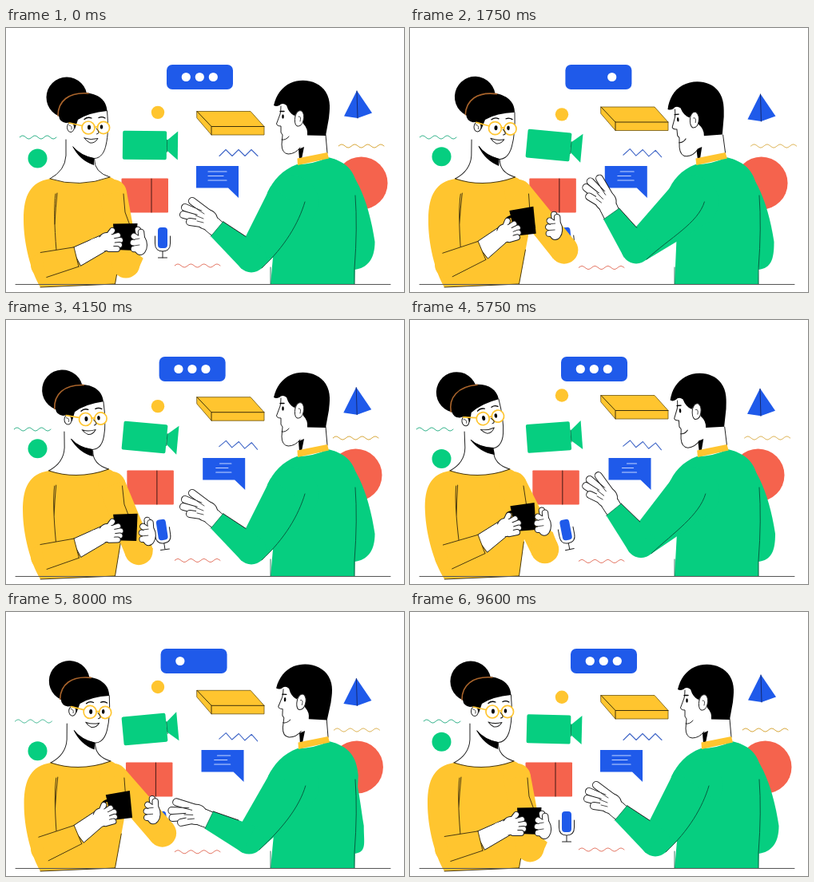
Animation, 498 px wide and 331 px high, one loop 9.65 s. Source, as an HTML page with a canvas:

```html
<!DOCTYPE html>
<html lang="en">
<head>
<meta charset="utf-8">
<title>Conversation</title>
<style>
  html, body { margin: 0; width: 100%; height: 100%; overflow: hidden; background: #fff; }
  canvas { display: block; width: 498px; height: 331px; }
</style>
</head>
<body>
<canvas id="stage"></canvas>
<script>
const BLUE = '#1f5aea', YELLOW = '#ffc52f', GREEN = '#06ce80', RED = '#f5634d';
const INK = '#000', LINE = '#222', FOLD = '#4a3a10', SEAM = '#075e40';
const LOOP = 9650, HALF = LOOP / 2, STEP = 50;
const W = 498, H = 331;
const canvas = document.getElementById('stage');
const c = canvas.getContext('2d');
const dpr = window.devicePixelRatio || 1;
canvas.width = W * dpr;
canvas.height = H * dpr;

// Smooth periodic curve through [time, value] keys, without overshoot.
function ease(t, period, keys) {
  const n = keys.length;
  const time = k => keys[(k + n) % n][0] + Math.floor(k / n) * period;
  const val = k => keys[(k + n) % n][1];
  const slope = k => (val(k + 1) - val(k)) / (time(k + 1) - time(k));
  const tangent = k => {
    const a = slope(k - 1), b = slope(k);
    return a * b <= 0 ? 0 : 2 * a * b / (a + b);
  };
  t %= period;
  let i = n - 1;
  while (time(i) > t) i--;
  const h = time(i + 1) - time(i), u = (t - time(i)) / h, u2 = u * u, u3 = u2 * u;
  return val(i) * (2 * u3 - 3 * u2 + 1) + val(i + 1) * (3 * u2 - 2 * u3)
    + h * (tangent(i) * (u3 - 2 * u2 + u) + tangent(i + 1) * (u3 - u2));
}

// Everything that moves is driven by these few signals.
let now, drift, lift, reach, raise, spread, sway;
function pose(t) {
  now = t;
  drift = ease(t, LOOP, [[0, 0], [1750, .55], [3100, .33], [4150, .78], [5750, 1], [8000, .62]]);
  lift = ease(t, HALF, [[0, 0], [925, .75], [1750, 1], [3100, 0], [4150, 0]]);
  reach = ease(t, HALF, [[0, 0], [1750, 0], [3100, 1], [4150, 0]]);
  raise = ease(t, HALF, [[0, 0], [925, .75], [1750, 1], [3100, 1], [4150, .1]]);
  spread = ease(t, HALF, [[0, 0], [925, 0], [1750, .85], [3100, 1], [4150, .65]]);
  sway = ease(t, HALF, [[0, 0], [925, -5], [1750, 1.5], [3100, 1], [4150, -1.5]]);
}
const bob = lag => Math.cos(2 * Math.PI * (now * 4 / LOOP - lag));

function paint(path, fill, stroke, width = 1) {
  if (fill) { c.fillStyle = fill; c.fill(path); }
  if (stroke) { c.strokeStyle = stroke; c.lineWidth = width; c.stroke(path); }
}
const shape = (d, fill, stroke, width) => paint(new Path2D(d), fill, stroke, width);
const poly = (pts, fill, stroke, width) => shape('M' + pts.join('L') + 'Z', fill, stroke, width);
const line = (pts, stroke = LINE, width = 1) => shape('M' + pts.join('L'), null, stroke, width);

function oval(x, y, rx, ry, fill, stroke, width) {
  const p = new Path2D();
  p.ellipse(x, y, rx, ry, 0, 0, 7);
  paint(p, fill, stroke, width);
}
const dot = (x, y, r, fill, stroke, width) => oval(x, y, r, r, fill, stroke, width);

function box(x, y, w, h, r, fill) {
  const p = new Path2D();
  p.roundRect(x, y, w, h, r);
  paint(p, fill);
}

// Draws in a frame moved by (x, y) and turned by deg.
function at(x, y, deg, draw) {
  c.save();
  c.translate(x, y);
  c.rotate(deg * Math.PI / 180);
  draw();
  c.restore();
}

// Leans a body sideways while its base stays on the ground.
function lean(k, draw) {
  c.save();
  c.transform(1, 0, -k, 1, 321 * k, 0);
  draw();
  c.restore();
}

// Tapered limb, round at a and cut flat at b; returns its two edges.
function limb(a, b, ra, rb, fill, stroke) {
  const dx = b[0] - a[0], dy = b[1] - a[1], len = Math.hypot(dx, dy) || 1;
  const nx = dy / len, ny = -dx / len;
  const edge = s => [[a[0] + s * nx * ra, a[1] + s * ny * ra], [b[0] + s * nx * rb, b[1] + s * ny * rb]];
  const p = edge(1), q = edge(-1);
  if (!stroke) dot(a[0], a[1], ra, fill);
  poly([p[0], p[1], q[1], q[0]], fill, stroke);
  return [p, q];
}

// Fingers are [x1, y1, x2, y2]; the palm hides their roots.
function hand(fingers, width, palm) {
  oval(...palm, '#fff', LINE, 2);
  for (const [x1, y1, x2, y2] of fingers) {
    line([[x1, y1], [x2, y2]], LINE, width + 2);
    line([[x1, y1], [x2, y2]], '#fff', width);
  }
  oval(...palm, '#fff');
}

function wave(x, y, periods, length, color) {
  const p = new Path2D();
  for (let i = 0; i <= length; i++) {
    p.lineTo(x + i, y - 2 * Math.sin(i / length * periods * 2 * Math.PI));
  }
  paint(p, null, color);
}

function typing() {
  const x = 201 - 12 * drift, t = now % HALF;
  box(x, 46, 83, 31, 7, BLUE);
  for (let i = 0; i < 3; i++) {
    if (t < 1250 + i * 300 || t >= 2800 + i * 400) dot(x + 24.3 + i * 17, 61.5, 5.6, '#fff');
  }
}

function chat() {
  at(238 + 10.5 * drift, 0, 0, () => {
    poly([[0, 173], [53, 173], [53, 213], [40, 200.5], [0, 200.5]], BLUE);
    for (let i = 0; i < 3; i++) {
      const y = 180 + i * 5.5;
      line([[15 + (i ? 2 : 8) * drift, y], [38 - 4 * (i % 2) - 3 * drift, y]], '#c5d5ff', 1.2);
    }
  });
}

function floating() {
  typing();
  dot(190, 102 - 8 * bob(.33), 8.2, YELLOW);
  dot(39.5, 167 + 7.3 * bob(.33), 12, GREEN);
  dot(444.5 - 9 * drift, 194.5, 33, RED);

  wave(17 - 9 * drift, 137, 3, 46, '#35b48c');
  wave(416 - 9 * drift + 15.5 * lift, 148, 3.5, 57, '#d9a93c');
  wave(211, 298 + 4.5 * drift, 3.5, 57, '#e57a68');
  at(291, 156.5, 5.5 * drift, () =>
    line([[-24, 4], [-16, -4], [-8, 4], [0, -4], [8, 4], [16, -4], [24, 4]], '#4268c8', 1.1));

  at(0, -10 * drift, 0, () => {
    poly([[239, 104.5], [306, 104.5], [323, 123.5], [323, 134], [257, 134], [239, 113]], YELLOW, '#6d540f', .8);
    line([[239, 104.5], [257, 123.5], [323, 123.5]], '#3e310a');
    line([[257, 123.5], [257, 134]], '#3e310a');
  });

  at(-drift, 7.3 * drift, 0, () => {
    poly([[439, 78.5], [458, 106.5], [440, 113], [423, 110.5]], BLUE);
    line([[439, 79], [440, 113]], '#152a72');
  });

  at(174, 147, -5.5 * bob(.27), () => {
    box(-28, -18, 55, 36, 2, GREEN);
    poly([[27, -6], [41, -18], [41, 18], [27, 6]], GREEN);
    line([[27.5, -7], [27.5, 8]], '#0a7d51');
  });

  at(8.8 * drift, 0, 0, () => {
    box(144.5, 188.5, 58.5, 43, 1, RED);
    line([[182, 189], [182, 231]], '#60261f', 1.2);
  });

  chat();

  at(196, 268, -11 * drift, () => {
    box(-6, -18, 12, 26, 4, BLUE);
    shape('M-9.5-7V2Q-9.5 12 0 12Q9.5 12 9.5 2V-7M0 12V20M-5.5 20H5.5', null, LINE);
  });
}

function womanHead() {
  dot(76, 87, 25.5, INK);
  shape('M77 117L127 100C129 118 128 134 125 147C122 161 114 165 107 163C95 160 84 153 79 138Z', '#fff');
  shape('M126.500 104C128 122 128 134 125 147C122 161 114 165 107 163C97 161 89 156 84 149', null, LINE);
  shape('M83 148Q94 160 110 163L110 172Q92 166 83 148Z', INK);
  shape('M66 110C65 93 80 80 98 81C116 82 126 91 126.500 104Q104 106 90 115L86 127Q83 117 75 119Q67 118 66 110Z', INK);
  shape('M65 110C65 92 78 80 103 82', null, '#a9642b', 1.6);
  oval(81, 124.5, 4.5, 6, '#fff', LINE);
  shape('M79 122Q83 122 82 127', null, LINE, .8);
  line([[79, 119], [95, 122.5]], YELLOW, 1.7);
  dot(103, 125, 8, '#fff', YELLOW, 1.7);
  dot(122, 125, 7.6, '#fff', YELLOW, 1.7);
  line([[110.5, 124], [114.5, 124]], YELLOW, 1.7);
  oval(104, 124.5, 2, 3, INK);
  oval(119.5, 124, 1.8, 2.8, INK);
  shape('M98 114.500Q102 111 107 113M116 112.500Q120 110.500 124 113', null, INK, 1.3);
  shape('M113 126Q119 132 113.500 133', null, LINE);
  shape('M98 138Q106 141 115 138.500Q111 145 105 144Q101 142 98 138Z', '#fff', LINE);
}

function woman() {
  lean(sway / 131, () => {
    shape('M75 125L75 160Q74 179 55 189Q92 201 130 187Q111 182 110.500 165L110 145Z', '#fff');
    shape('M75 140L75 160Q74 179 55 189M110.500 164Q110 181 130 187', null, LINE);
    shape('M55 189C31 193 22 209 22 240C22 270 31 305 43 325L136.500 321L147 262L152 225C148 202 141 191 130 187Q92 201 55 189Z', YELLOW);
    shape('M55 189Q92 201 130 187M62 208Q59 230 63 279M64 207Q62 225 61 246M136.500 321L144 278M43 325L136 321', null, FOLD);
  });
  at(92 + sway, 165, 1.9 * sway, () => {
    c.translate(-92, -165);
    womanHead();
  });

  const shoulder = [134 + sway, 207];
  const elbow = [150 + 21 * spread + 25 * raise, 296 - 8 * spread - 11 * raise];
  const grip = [166 + 17 * spread, 267 - 19 * raise];
  const cup = [149 - 9 * raise + 2 * spread, 262 - 19 * raise];

  limb(shoulder, elbow, 17, 17.5, YELLOW);
  limb(elbow, [grip[0] + (elbow[0] - grip[0]) * .22, grip[1] + 14], 17.5, 12, YELLOW);
  shape(`M${147 + sway} 208L${149 + sway * .7} 231L${156 + sway * .5} 250`, null, FOLD);

  at(...cup, -9 * raise, () => {
    poly([[-15, -16.5], [15.5, -17], [13.5, 17], [-12.5, 16]], INK);
    shape('M-13-9Q-23-9-20 0Q-18 7-12 7', null, INK, 3);
  });

  at(...grip, 4 * spread, () => {
    hand([[1, -3, -1, -14], [4, -2, 3, -11], [3, 0, -6, -6], [4, 5, -7, 2], [4, 10, -6, 10]], 6.5, [2, 5, 8, 12]);
    shape('M-5-2L1-3M-6 6L1 5', null, LINE, .8);
  });

  const wrist = [88 + 2 * raise, 287 - 8 * raise];
  const fist = [cup[0] - 22, cup[1] + 5 + 8 * raise];
  limb(wrist, fist, 12.5, 10, '#fff', LINE);
  at(...fist, -16 * raise, () => {
    hand([[0, -5, 6, -13], [4, -4, 13, -7], [5, 1, 16, -1], [4, 6, 15, 5], [2, 10, 12, 10]], 6, [-1, 1, 10, 11]);
    limb([-16, 6], [-4, 3], 9, 9, '#fff');
  });
  const edges = limb([47, 297], wrist, 16, 12.5, YELLOW);
  edges.forEach(e => line(e, FOLD));
  line([edges[0][1], edges[1][1]], FOLD);
}

function manHead() {
  shape('M347 86C343 96 344 103 343 108L338.500 120Q339 123 344 123L344 131L346 134L345 146Q345 157 353 158Q362 158 368 150L377 134L398 130L385 85Z', '#fff');
  shape('M344 98Q344 104 343 108L338.500 120Q339 123 344 123L344 131L346 134L345 146Q345 157 353 158Q362 158 368 150', null, LINE);
  shape('M335 97C338 84 345 74 356 69C372 62 392 67 400 80C407 91 405 103 404 113L400 135L377 134.500Q378 126 372 120L366 104L361 110Q354 107 351 97Q346 93 342 97Q338 99 335 97Z', INK);
  shape('M362 110Q365 102 370 104Q374 108 372 116Q370 124 364 123Q360 120 362 110Z', '#fff', LINE);
  shape('M366 111Q370 110 368 117', null, LINE, .8);
  oval(346.5, 111, 1.3, 2.7, INK);
  line([[343, 104.5], [348, 104.5]], INK, 1.4);
  shape('M345 140Q350 141 354 136', null, LINE);
}

function man() {
  // Rest pose plus its shifts towards the lifted and the reaching pose.
  const mix = (rest, up, out) => rest + up * lift + out * reach;
  const shift = mix(0, -7, 1), k = shift / 156;
  const back = mix(461.5, -6, -14);
  lean(k, () => {
    poly([[367, 145], [400, 128], [402, 159], [367, 166]], '#fff');
    line([[400, 134], [402, 157]]);
    poly([[366, 152], [373, 149], [370, 164], [367, 165]], INK);
  });
  at(383 + shift, 157, mix(0, -5.5, 2), () => {
    c.translate(-383, -157);
    manHead();
  });

  const elbow = [mix(307, -24, -3), mix(288, -11, -3)];
  const wrist = [mix(264, -12, -10), mix(252, -19, 9)];

  at(...wrist, mix(0, 23, -20), () => {
    limb([-10, -9], [6, 5], 11, 10.5, '#fff', LINE);
    hand([[-11, -20, -31, -35], [-17, -17, -40, -27], [-17, -11, -42, -18], [-13, -6, -34, -9]], 8, [-13, -12, 13, 12]);
    limb([-10, -9], [6, 5], 10.4, 9.8, '#fff');
    shape('M-25-25L-16-19M-27-17L-17-13M-25-10L-17-8', null, LINE, .8);
  });

  shape(`M${408 + shift} 164C${435 + shift} 170 ${back - 8} 215 ${back} 268C${back} 290 452 301 436 303Z`, GREEN);
  lean(k, () => {
    shape('M364 171C346 178 334 190 327 208L336 265L331 321.500L436 321.500L438 260L440 205C438 181 428 168 403 162Q385 171 364 171Z', GREEN);
    poly([[364.5, 163.5], [402, 156], [404, 163.5], [365, 172]], YELLOW);
  });
  limb([358 + shift * .7, 218], elbow, 33, 18.5, GREEN);
  const [upper, lower] = limb(elbow, wrist, 18.5, 12, GREEN).sort((p, q) => p[1][1] - q[1][1]);
  const [a, b] = upper;
  line([b, [b[0] + (a[0] - b[0]) * .6, b[1] + (a[1] - b[1]) * .6]]);
  line([b, lower[1]], '#08734c', .8);
  const top = 374 + shift * .8;
  shape(`M${top} 218C${top - 8} 245 ${elbow[0] + 42} ${elbow[1] - 14} ${elbow[0] + 13} ${elbow[1] + 13}`, null, SEAM);
  shape('M437 210Q440 250 436 302L436 321', null, SEAM);
  line([[331, 300], [331, 321]], SEAM, .8);
}

function render() {
  pose(Math.floor(performance.now() / STEP) * STEP % LOOP);
  c.setTransform(dpr, 0, 0, dpr, 0, 0);
  c.fillStyle = '#fff';
  c.fillRect(0, 0, W, H);
  c.lineCap = c.lineJoin = 'round';
  floating();
  woman();
  man();
  line([[12, 321.5], [481, 321.5]], '#555');
  requestAnimationFrame(render);
}
render();
</script>
</body>
</html>
```
